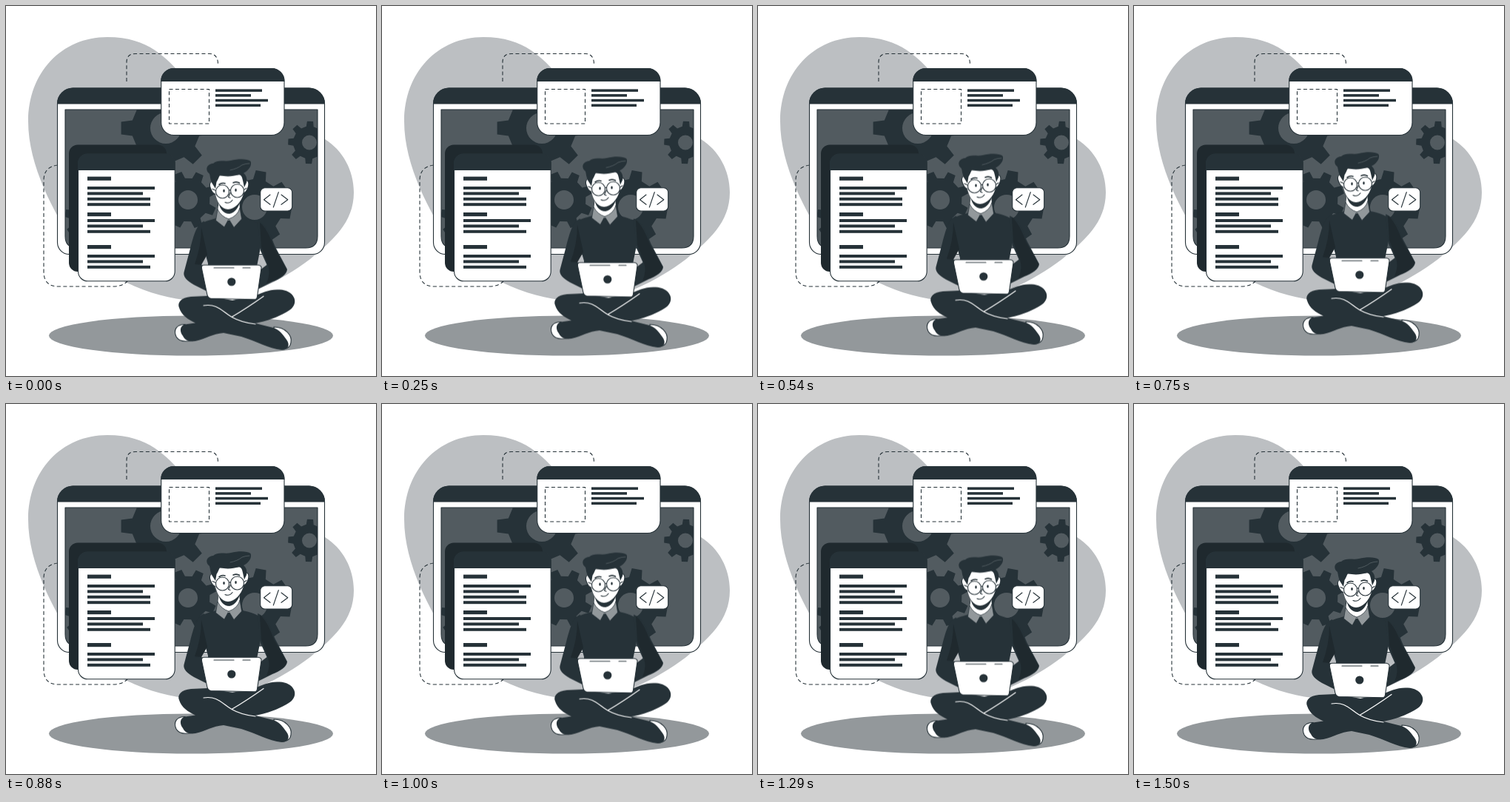
An HTML page that plays this animation: 500x500 px, repeating every 1.54 s.

```html
<!DOCTYPE html>
<html lang="en">
<head>
<meta charset="utf-8">
<title>Developer at work</title>
<style>
  html, body { margin: 0; width: 100%; height: 100%; overflow: hidden; background: #fff; }
  svg { display: block; width: 100vw; height: 100vh; }
  .ink { fill: #263238; }
  .deep { fill: #1f292e; }
  .paper { fill: #fff; stroke: #263238; stroke-width: 1.1; }
  .line { fill: none; stroke: #263238; stroke-width: 1.1; stroke-linecap: round; stroke-linejoin: round; }
  .dash { stroke-dasharray: 5 3.4; stroke-linecap: butt; }
  .seam { fill: none; stroke: #fff; stroke-width: 1.2; stroke-linecap: round; }
  .fold { fill: none; stroke: #606a6f; stroke-width: .7; stroke-linecap: round; }
  #man { animation: float 1540ms linear infinite; }
  @keyframes float {
    0% { transform: translateY(-.27px); }
    47.4% { transform: translateY(-10px); }
    96.1%, 100% { transform: translateY(0); }
  }
</style>
</head>
<body>
<svg viewBox="0 0 500 500">
  <defs>
    <clipPath id="screen"><path d="M80 140H421V311Q421 327 405 327H96Q80 327 80 311Z"/></clipPath>
  </defs>

  <path fill="#bcbfc2" d="M30 156C30 90 75 42 137 42C194 42 216 71 240 95C300 150 390 155 431 180C455 195 470 222 470 252C470 293 441 317 411 342C371 372 320 399 262 398.500C208 398 137 371 95 325C65 280 30 216 30 156Z"/>
  <ellipse cx="250" cy="445.500" rx="192" ry="27" fill="#93989b"/>
  <path class="line dash" d="M163 102V76Q163 64.500 175 64.500H275Q286 64.500 286.500 78"/>
  <path class="line dash" d="M70 215Q51 217 51 236V359Q51 379 71 379H145Q157 379 164 372"/>

  <!-- Monitor -->
  <path class="paper" d="M69.500 132V132A21 21 0 0 1 90.500 111H409.500A21 21 0 0 1 430.500 132V319.500A16 16 0 0 1 414.500 335.500H85.500A16 16 0 0 1 69.500 319.500Z"/>
  <path class="ink" d="M69 132.500A21.500 22 0 0 1 90.500 110.500H409.500A21.500 22 0 0 1 431 132.500Z"/>
  <g clip-path="url(#screen)">
    <rect x="80" y="140" width="341" height="187" fill="#525b60"/>
    <g id="gears" class="ink" fill-rule="evenodd"></g>
  </g>
  <path class="line" d="M80 140H421V311Q421 327 405 327H96Q80 327 80 311Z"/>

  <!-- Document windows -->
  <rect class="deep" x="85" y="187.500" width="132" height="171.500" rx="12"/>
  <rect class="paper" x="97.500" y="200" width="130.700" height="171.800" rx="13"/>
  <path class="ink" d="M97 222V212.500A13 13 0 0 1 110 199.500H215.700A13 13 0 0 1 228.700 212.500V222Z"/>

  <!-- Top window -->
  <rect class="paper" x="209.700" y="84.500" width="166.300" height="90" rx="17"/>
  <path class="ink" d="M209.200 102A17.500 18 0 0 1 226.700 84H359A17.500 18 0 0 1 376.500 102Z"/>
  <rect class="line dash" x="220.500" y="112.500" width="54" height="46.500"/>
  <g id="bars" class="ink"></g>

  <!-- Code badge -->
  <rect class="paper" x="343.700" y="245.800" width="43" height="31.200" rx="6"/>
  <path class="line" d="M357 255L348.500 261.700L357 268.300M368.300 251.500L361.300 272M372 255L380.800 261.700L372 268.300"/>

  <g id="man">
    <!-- Torso and arms -->
    <path class="ink" d="M284 287C275 290 267 291 262 296L265 320L273 348V386H340L339 352L345 322L349 301C342 292 330 289 319 287Z"/>
    <path class="ink" d="M268 291C258 294 254 309 249 328L240.500 360C239 366 245 372 254 377L272 386V352L264 350L268 332Z"/>
    <path class="ink" d="M340 291C353 296 358 311 364 326L380 356C380 363 370 369 360 373L338 384L342 358L352.500 350L344 331Z"/>
    <path class="deep" d="M343 293C351 299 357 312 362 326L379 356C379 362 370 368 360 372L352 375Q358 362 354 350L345 326Z"/>
    <path class="deep" d="M264 300L272 336L264 350L255 349Q264 325 264 300Z"/>

    <!-- Neck and head -->
    <path fill="#fff" d="M288 262L286 280Q293 290 301 290Q311 287 316 277L315 258Z"/>
    <path class="ink" d="M286 260Q289 281 302 281Q313 279 318 260Z"/>
    <path class="paper" d="M283 238C275 235 274 242 277 248C279 253 282 255 284 254ZM322 236C329 234 329 242 326 248C324 252 322 253 320 253Z"/>
    <path fill="#fff" d="M282 230L283 254C285 265 291 275 300 275C309 275 318 265 321 254L323 228Z"/>
    <path class="ink" d="M278 239C276 234 276 231 275 227C269 223 270 214 280 213C286 207 296 211 304 209C314 206.500 326 206.500 330.500 210C333 216 327 223 321 226C325 229 326 234 325 239L322 245L320 236C319 231 318 229 315 228C306 231 296 231 289 229C287 233 286 236 284.500 238L283 247Z"/>
    <path class="fold" d="M303 222Q313 220 319 215Q324 213 329 213"/>
    <g class="line">
      <circle cx="292.500" cy="251" r="9"/>
      <circle cx="312.500" cy="250" r="9"/>
      <path d="M301.500 249.500Q302.500 248 303.500 249M283.500 249.500L279 247.500M321.500 248.500L325 246.500M303.500 252L300.500 258.500L303 259.500M296 265.500Q302 268 306 262.500"/>
      <path stroke-width="1.600" d="M288 241.500Q292 238.500 296 240M307 239Q312 237 315.500 239.500"/>
    </g>
    <ellipse class="ink" cx="294.500" cy="250" rx="1.300" ry="2.100"/>
    <ellipse class="ink" cx="310.500" cy="249" rx="1.300" ry="2.100"/>
    <path fill="#92989b" stroke="#263238" stroke-width=".7" stroke-linejoin="round" d="M286 275L283.500 290L295 299L301 288Q291 285 286 275ZM316 273L318.500 288L308 299.500L301 288Q313 284 316 273Z"/>

    <!-- Legs and shoes -->
    <path class="paper" d="M242 430.500C230 430.500 226 438 230 447C234 455 246 454 257 451ZM362 434C378 434 387 446 385 455C384 465 372 466 362 461Z"/>
    <path class="ink" d="M272 392L250 393C237 394 231 401 234 408C237 418 246 424 256 428.500L242 430.500C235 432 234 440 239 446C242 452 247 454.500 256 453C270 450 279 443 294 442L318 447C338 453 354 463 373 465C382 464.500 384 458 379 451C374 444 370 438 361 435L337 429C354 426 377 417 386 409C396 399 388 384.500 370 383.500C356 382.500 346 388 338 391L306 398Z"/>
    <path class="seam" d="M267 405C286 402 292 413 305 420.500Q318 428 337 430M348 392.500C336 401 323 410 305 420.500"/>

    <!-- Laptop -->
    <path class="paper" d="M268 350.200H341Q345.500 351 345 354.500L339.500 393Q339 397 335 396.800L277 395.500Q273 395 272 391L264.500 355Q263.500 350.500 268 350.200Z"/>
    <path class="line" stroke-width="1.400" d="M281 354H308M320 354H330"/>
    <circle class="ink" cx="304.800" cy="373" r="5.600"/>
  </g>
</svg>
<script>
  // Toothed wheel with a round hole; tilt is in degrees.
  function gear(cx, cy, outer, hole, tilt, teeth = 8) {
    const step = 2 * Math.PI / teeth, body = outer * .76;
    const at = (r, a) => `${(cx + r * Math.cos(a)).toFixed(2)} ${(cy + r * Math.sin(a)).toFixed(2)}`;
    const pts = [];
    for (let i = 0; i < teeth; i++) {
      const a = tilt * Math.PI / 180 + i * step;
      pts.push(at(body, a - step * .29), at(outer, a - step * .18),
               at(outer, a + step * .18), at(body, a + step * .29));
    }
    return `<path d="M${pts.join('L')}ZM${cx - hole} ${cy}a${hole} ${hole} 0 1 0 ${2 * hole} 0a${hole} ${hole} 0 1 0 ${-2 * hole} 0Z"/>`;
  }

  const bar = (x, y, w, h) => `<rect x="${x}" y="${y}" width="${w}" height="${h}"/>`;
  const title = y => bar(110, y, 32, 5.2);
  const lines = (y, ...widths) => widths.map((w, i) => bar(110, y + i * 7.4, w, 4)).join('');

  document.getElementById('gears').innerHTML =
    gear(216, 165, 61, 21, 0) + gear(410, 184.5, 29, 10, 2) +
    gear(246, 262, 39, 13, 24) + gear(336, 272, 50, 17, 10) + gear(114, 287, 35, 11, 12);

  document.getElementById('bars').innerHTML =
    title(230.6) + lines(244, 91, 75, 85, 85) +
    title(279) + lines(288, 91, 75, 85) +
    title(323) + lines(336, 91, 75, 85) +
    [63, 48, 71, 61].map((w, i) => bar(283, 112.4 + i * 6.7, w, 3.5)).join('');
</script>
</body>
</html>
```
